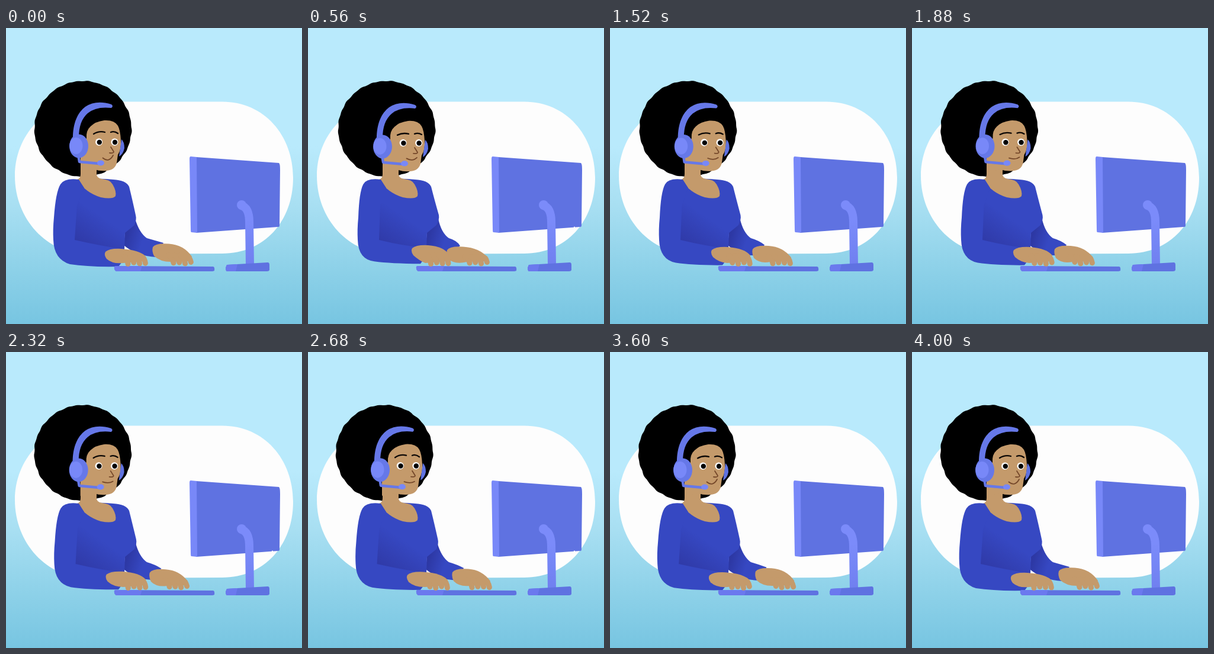
Animation of 500 by 500 pixels, one loop 4.04 s. Source, as an HTML page:

```html
<!DOCTYPE html>
<html lang="en">
<head>
<meta charset="utf-8">
<title>Support agent typing</title>
<style>
html, body { margin: 0; width: 100%; height: 100%; overflow: hidden; background: #b9eafc; }
svg { display: block; width: 100vw; height: 100vh; }
.skin { fill: #c49a6b; }
.blue { fill: #3648c2; }
.mid { fill: #5f72e1; }
.light { fill: #7888f8; }
.line { fill: none; stroke-linecap: round; stroke-linejoin: round; }
.finger { stroke: #c49a6b; stroke-width: 9; }
</style>
</head>
<body>
<svg viewBox="0 0 500 500" preserveAspectRatio="none">
  <defs>
    <linearGradient id="sky" x1="0" y1="0" x2="0" y2="1">
      <stop offset=".4" stop-color="#b9eafc"/>
      <stop offset=".6" stop-color="#a8dff2"/>
      <stop offset=".8" stop-color="#8fd2e9"/>
      <stop offset="1" stop-color="#77c5e1"/>
    </linearGradient>
    <linearGradient id="chest" gradientUnits="userSpaceOnUse" x1="128" y1="370" x2="163" y2="319">
      <stop offset="0" stop-color="#2f39a6"/>
      <stop offset="1" stop-color="#3648c2"/>
    </linearGradient>
    <linearGradient id="sleeve" gradientUnits="userSpaceOnUse" x1="203" y1="354" x2="230" y2="362">
      <stop offset="0" stop-color="#2d38a4"/>
      <stop offset="1" stop-color="#3648c2"/>
    </linearGradient>
    <linearGradient id="stand" gradientUnits="userSpaceOnUse" x1="0" y1="300" x2="0" y2="398">
      <stop offset=".25" stop-color="#7b8bfa"/>
      <stop offset="1" stop-color="#7080f0"/>
    </linearGradient>
    <filter id="rough" filterUnits="userSpaceOnUse" x="0" y="0" width="500" height="500" color-interpolation-filters="sRGB">
      <feTurbulence id="noise" type="fractalNoise" baseFrequency=".07" numOctaves="1" seed="1"/>
      <feDisplacementMap in="SourceGraphic" scale="1.5" xChannelSelector="R" yChannelSelector="G"/>
    </filter>
  </defs>

  <rect width="500" height="500" fill="url(#sky)"/>
  <path fill="#fdfdfd" d="M136 124.500L365 124.500C437 124.500 485 182 485 253C485 326 437 381 365 381L140 382C68 382 15 322 15 250C15 182 66 124.500 136 124.500Z"/>

  <g filter="url(#rough)">
    <path class="mid" d="M321 218L461 228Q463 229 463 240L462 334Q462 336 459 336L321 346Z"/>
    <path class="light" d="M312 217L322 218L323 346L313 345Q312 345 312 340L310 221Q310 217 312 217Z"/>
    <path class="line" stroke="url(#stand)" stroke-width="14" d="M398 300Q411 304 411 328L412 400"/>
    <circle cx="398" cy="299" r="8" fill="#7b8bfa"/>
    <path class="mid" d="M373 400L442 396Q445 396 445 400L445 409Q444 411 441 411L373 411Q371 410 371 405Z"/>
    <path fill="#6b79ee" d="M373 400L391 399L388 411L373 411Q371 410 371 405Z"/>

    <g id="hairBox"><path id="hair"/></g>
    <path id="rightArm" fill="url(#sleeve)"/>
    <path id="torso" fill="url(#chest)"/>
    <path class="skin" d="M126 200L126 247Q126 254 120 256Q134 278 160 286Q180 290 185 284Q187 276 180 264Q176 256 162 255Q152 253 153 245L154 205Z"/>
    <path id="leftArm" class="blue"/>

    <g id="head">
      <path class="skin" d="M126 207L136 186Q135 173 143 166Q151 158 166 156Q183 155 189 165Q193 172 194 190Q195 205 189 214L187 228Q184 240 170 241Q158 242 150 239L126 243Z"/>
      <path class="mid" d="M195 188Q200 192 200 203Q198 213 191 217Q193 203 195 188Z"/>
      <g class="line" stroke="#0b0705" stroke-width="2.3">
        <path id="browL"/>
        <path id="browR"/>
      </g>
      <g id="eyes">
        <ellipse cx="157" cy="192.600" rx="6" ry="6.200" fill="#fff"/>
        <ellipse cx="183.500" cy="192.600" rx="6" ry="6.200" fill="#fff"/>
        <circle cx="157.800" cy="193" r="4.200"/>
        <circle cx="184" cy="193" r="4.200"/>
      </g>
      <g class="line" stroke="#75482a" stroke-width="1.8">
        <path d="M177 201L182 209Q182 212 175 211"/>
        <path id="mouth"/>
      </g>
      <path fill="#6678e8" d="M113 187C113 160 121 143 134 133Q152 121 178 129Q182 132 178 135Q152 132 138 144Q123 157 123 185Z"/>
      <path class="line" stroke="#6678e8" stroke-width="4.500" d="M122 214L124 226L157 229"/>
      <ellipse class="light" cx="160" cy="228" rx="6" ry="4.600"/>
      <ellipse cx="123" cy="199.500" rx="16" ry="20" fill="#6678e8"/>
      <ellipse class="light" cx="118.500" cy="199" rx="11" ry="14"/>
    </g>
    <path class="mid" d="M185 402L350 403Q353 404 352 410L349 411L186 411Q182 408 183 403Z"/>
    <path fill="#6b79ee" d="M185 402L230 402L227 411L186 411Q182 408 183 403Z"/>
    <path id="rightHand" class="skin"/>
    <g id="rightFingers" class="line finger"></g>
    <path id="leftHand" class="skin"/>
    <g id="leftFingers" class="line finger"></g>
  </g>
</svg>
<script>
const LOOP = 4040, STEP = 40;
const times = [0, 560, 1160, 1880, 2680, 3240, 4000, LOOP];
const poses = {
  head:   [0, 3, 3, .5, -1, 0, 0],
  lean:   [0, 4, 3, 3, .5, .3, 0],
  leftX:  [0, 8, 4, 4, 0, 0, 0],
  leftY:  [0, -6, -3, -3, -1.5, -1.5, 0],
  rightX: [0, -13, -7, -7, -4, -4, 0],
  rightY: [0, 5, 3.5, 3.5, 2, 1.5, 0],
  reach:  [0, -10, -8, -8, -6, -5, 0],
  brow:   [0, 2, 2, 1.5, -1, 1.5, 0],
  smile:  [228, 225, 224, 223, 223, 228, 228],
  lip:    [215, 218, 219, 218, 219, 215, 215]
};

const el = id => document.getElementById(id);
const draw = (id, d) => el(id).setAttribute('d', d);
const move = (id, x, y) => el(id).setAttribute('transform', `translate(${x} ${y})`);

function addFingers(id) {
  const ns = 'http://www.w3.org/2000/svg';
  return Array.from({ length: 4 }, () => el(id).appendChild(document.createElementNS(ns, 'path')));
}
const leftFingers = addFingers('leftFingers');
const rightFingers = addFingers('rightFingers');

// Scalloped oval for the curls
const curls = Array.from({ length: 180 }, (_, i) => {
  const a = i * Math.PI / 90;
  const r = 1 + .005 * Math.sin(a * 29) + .004 * Math.sin(a * 17 + 1);
  return `${(130 + 82 * r * Math.cos(a)).toFixed(1)} ${(170.5 + 81 * r * Math.sin(a)).toFixed(1)}`;
});
draw('hair', 'M' + curls.join('L') + 'Z');

function poseAt(t) {
  let i = 0;
  while (t >= times[i + 1]) i++;
  const u = (t - times[i]) / (times[i + 1] - times[i]);
  const k = u * u * (3 - 2 * u);
  const pose = {};
  for (const name in poses) {
    const v = poses[name];
    pose[name] = v[i] + (v[(i + 1) % v.length] - v[i]) * k;
  }
  return pose;
}

const tap = (t, phase) => 2.5 * Math.sin(Math.PI * 7 * t / LOOP + phase) ** 2;

function drawArms(p) {
  const { lean: b, leftX: lx, leftY: ly, rightX: rx, rightY: ry } = p;
  draw('torso', `M112 258Q150 252 181 256Q203 257 208 268Q213 288 ${219 + b / 2} 316Q${221 + b / 3} 323 217 333L201 346L200 375L112 375L105 262Z`);
  draw('rightArm', `M203 320L${218 + b / 2} 322Q225 346 238 355Q252 359 ${266 + rx * .7} ${363 + ry}L${254 + rx} ${387 + rx * .4}Q220 385 199 367Z`);
  draw('leftArm', `M123 256Q99 253 ${92 + b / 3} 264Q${84 + b * .6} 277 ${81 + b} 320Q${79 + b} 340 ${80 + b} 358Q${81 + b} 391 ${108 + b} ${399 + ly * .8}
    Q140 ${404 + ly} 190 ${403 + ly * .8}L200 ${390 + ly}L200 ${374 + ly * .4}Q160 368 ${116 + b} 358L${120 + b / 2} 300L132 270Z`);
}

function drawHands(t, p) {
  const { leftX: lx, leftY: ly, rightX: rx, rightY: ry, reach } = p;
  draw('leftHand', `M${168 + lx} ${378 + ly}Q${175 + lx} ${372 + ly} ${195 + lx} ${373 + ly}Q${226 + lx / 2} ${375 + ly} ${236 + lx / 4} ${386 + ly / 2}
    L${235 + lx / 4} 394L198 397Q${180 + lx} ${399 + ly} ${170 + lx} ${390 + ly}Q${165 + lx} ${383 + ly} ${168 + lx} ${378 + ly}Z`);
  draw('rightHand', `M${248 + rx} ${370 + ry}Q${253 + rx} ${363 + ry} ${275 + rx} ${364.5 + ry}Q${300 + reach} ${366 + ry} ${314 + reach} ${386 + ry / 2}
    L${309 + reach} 394L${279 + reach} 395Q${260 + rx} ${395 + ry} ${250 + rx} ${385 + ry}Q${246 + rx} ${377 + ry} ${248 + rx} ${370 + ry}Z`);
  leftFingers.forEach((f, i) => {
    const x = 205 + i * 9.8 + lx / 5;
    f.setAttribute('d', `M${x - 5} ${386 + ly / 2}Q${x} 389 ${x + 1} ${398.5 - tap(t, i * 1.3)}`);
  });
  rightFingers.forEach((f, i) => {
    const x = 282 + i * 9.8 + reach;
    f.setAttribute('d', `M${x - 7} ${384 + ry / 2}Q${x - 1} 387 ${x + 1} ${398 - tap(t, i * 1.3 + .8)}`);
  });
}

function drawHead(p) {
  move('hairBox', p.head, 0);
  move('head', p.head, p.head * .3);
  move('eyes', p.head * .2, p.head * .2);
  draw('browL', `M148 ${179 + p.brow / 2}Q157 ${173.5 + p.brow} 167 ${176 + p.brow}`);
  draw('browR', `M177 ${176 + p.brow}Q183 ${173.5 + p.brow} 189 ${178 + p.brow / 2}`);
  draw('mouth', `M163.500 219.500Q174 ${p.smile} 181 ${p.lip}`);
}

const start = performance.now();
function frame() {
  const t = Math.floor((performance.now() - start) % LOOP / STEP) * STEP;
  const pose = poseAt(t);
  drawArms(pose);
  drawHands(t, pose);
  drawHead(pose);
  el('noise').setAttribute('seed', 1 + Math.floor(t / 120) % 3);
  requestAnimationFrame(frame);
}
frame();
</script>
</body>
</html>
```
